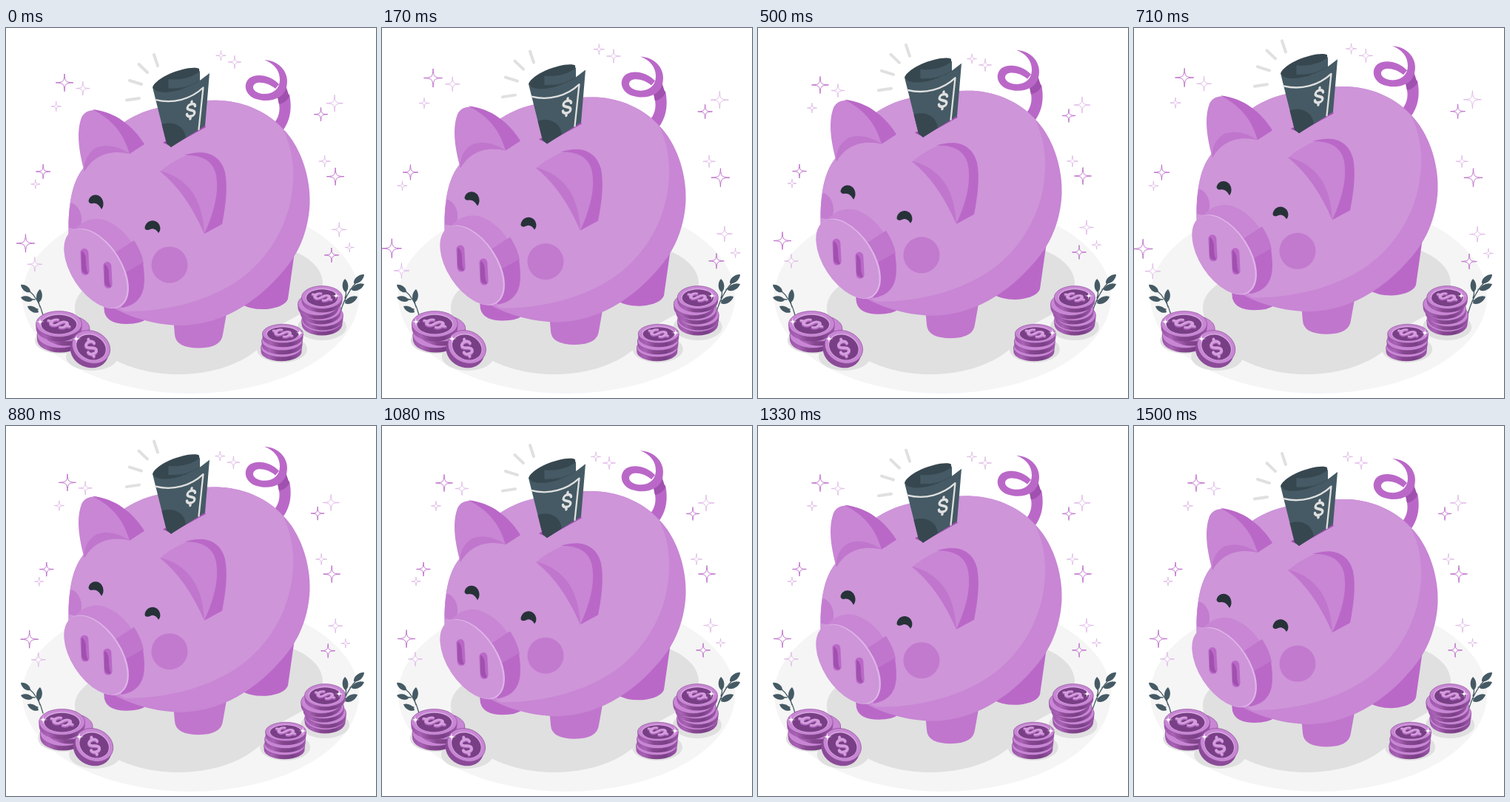
Animation, 500 px wide and 500 px high, one loop 1.54 s. Source, as an HTML page:

```html
<!DOCTYPE html>
<html lang="en">
<head>
<meta charset="utf-8">
<title>Piggy bank</title>
<style>
html, body { margin: 0; width: 100%; height: 100%; overflow: hidden; background: #fff; }
svg { display: block; width: 100vw; height: 100vh; }
</style>
</head>
<body>
<svg id="stage" viewBox="0 0 500 500" xmlns="http://www.w3.org/2000/svg"></svg>
<script>
const C = {
  light: '#ce95d9', mid: '#c886d4', leg: '#c076cd', deep: '#ba68c8', shade: '#a050ae',
  coin: '#793f86', ink: '#263238', bill: '#455a64', billDark: '#37474f', grey: '#e0e0e0'
};
const path = (d, fill, extra = '') => `<path d="${d}" fill="${fill}" ${extra}/>`;
const line = (d, color, w, extra = '') =>
  `<path d="${d}" fill="none" stroke="${color}" stroke-width="${w}" stroke-linecap="round" stroke-linejoin="round" ${extra}/>`;
const oval = (x, y, rx, ry, fill, extra = '') =>
  `<ellipse cx="${x}" cy="${y}" rx="${rx}" ry="${ry}" fill="${fill}" ${extra}/>`;
const group = (id, body) => `<g id="${id}">${body}</g>`;

const STAR = 'M0-10C.6-1 1-.6 10 0C1 .6 .6 1 0 10C-.6 1-1 .6-10 0C-1-.6-.6-1 0-10Z';
const star = (x, y, r, color) => path(STAR, '#fff',
  `stroke="${color}" stroke-width=".9" vector-effect="non-scaling-stroke" transform="translate(${x} ${y}) scale(${r / 10})"`);
const glint = (x, y) => path(STAR, '#fff', `transform="translate(${x} ${y}) scale(.6)"`);

const dollar = (transform, color, w) => line(
  'M5.5-4.5C5-9.5-5-9.5-5.500-4C-5.500 1 5.500-1 5.500 4.500C5.500 9.500-5 9.500-5.500 4.500M0-11.500V-8M0 8V11.500',
  color, w, `transform="${transform}"`);

function leaf(x, y, tx, ty) {
  const dx = tx - x, dy = ty - y, nx = -dy * .3, ny = dx * .3;
  const at = (f, s) => `${x + dx * f + nx * s} ${y + dy * f + ny * s}`;
  return path(`M${x} ${y}C${at(.2, 1)} ${at(.75, .9)} ${tx} ${ty}C${at(.75, -.9)} ${at(.2, -1)} ${x} ${y}`, C.bill);
}

function coin(x, y, rx, ry, h, face) {
  const side = `M${x - rx} ${y}v${h}a${rx} ${ry} 0 0 0 ${2 * rx} 0v${-h}z`;
  let out = path(side, 'url(#edge)') + oval(x, y, rx, ry, '#c886d4', 'stroke="#84488f" stroke-width=".6"');
  if (face) {
    const lay = `scale(1 .55) rotate(-62) scale(${rx / 23})`;
    out += oval(x, y, rx * .81, ry * .79, '#d9abe2') + oval(x, y + .6, rx * .77, ry * .73, C.coin) +
      dollar(`translate(${x} ${y + .8}) ${lay}`, '#b268c0', 4) +
      dollar(`translate(${x} ${y - .8}) ${lay}`, '#d49edd', 3.6);
  }
  return out;
}

const ground = oval(249.5, 363, 227.5, 131, '#f5f5f5') +
  path('M93 378C95 430 160 468 232 468C300 468 345 440 366 405C385 390 428 380 428 345C428 325 408 308 385 300L140 330C110 345 93 360 93 378Z', C.grey);

const twigs =
  line('M50 388C47 375 40 362 29 353M46 377Q43 370 45 362M43 380L36 379M39 367L31 366', C.bill, 1.3) +
  leaf(33, 357, 20, 347) + leaf(36, 368, 20, 364) + leaf(44, 384, 29, 376) + leaf(44, 371, 46, 353) +
  line('M450 391C455 370 463 353 478 339M458 365Q461 358 458 350M457 369L466 367M465 353L472 351', C.bill, 1.3) +
  leaf(470, 345, 484, 333) + leaf(459, 357, 458, 339) + leaf(467, 354, 484, 346) + leaf(458, 372, 475, 363);

const tail =
  path('M374 88L383 90C388 114 381 130 373 140L360 131C368 123 372 112 368 98Z', C.deep) +
  path('M378 78L383 93Q378 101 369 103L366 90Z', C.shade) +
  path('M349 43C371 44 384 62 379 80C375 97 354 101 338 96C323 91 319 75 330 67C340 61 358 64 369 76L364 82C355 74 343 72 337 75C330 80 336 88 347 89C361 90 370 82 370 70C370 57 362 48 349 43Z', C.deep);

const back = 'M85 285C83 245 88 210 104 190C115 172 140 150 157 129C170 120 186 112 205 108C230 101 260 97 290 98C325 100 355 115 374 136';
const body =
  path('M131 365L133 384Q137 400 163 400Q182 400 190 393L190 370Z', C.deep) +
  path('M318 360L318 373Q330 381 352 380Q377 377 381 366L390 303Z', C.deep) +
  path('M225 380L228 414Q229 432.500 261 432.500Q291 432 293 414L300 375Z', C.leg) +
  path(back + 'C397 158 412 200 410.500 238C409 270 398 300 380 322C350 360 300 402 235 402C197 401 155 389 120 362Z', C.mid) +
  path(back + 'C386 160 389 185 388 205C386 258 360 305 322 335C285 364 225 384 160 383L120 362Z', C.light) +
  path('M88 236C100 240 107 259 98 272L85 270Q84 250 88 236Z', C.leg, 'opacity=".8"') +
  oval(221, 320, 24.5, 24.5, C.leg, 'opacity=".85"');

const ears =
  path('M106 194C98 165 95 140 102 121C106 112 116 109 126 112C155 120 174 135 187 157L167 170C150 165 120 168 106 194Z', C.mid) +
  path('M106 194C104 181 112 166 124 161C138 157 152 160 167 170C145 165 121 168 106 194Z', C.leg) +
  path('M117 110C148 113 172 133 187 157L167 170C158 140 143 124 117 110Z', C.deep) +
  path('M208 194C230 176 255 164 274 170C297 178 301 210 292 265L268 278C252 240 233 215 208 194Z', C.mid) +
  path('M208 193C247 203 266 232 268 278C252 242 234 214 208 193Z', C.leg) +
  path('M241 172C265 164 289 168 296 195C300 215 297 240 292 265L268 278C282 248 289 218 283 195C278 178 262 171 241 172Z', C.deep);

const nostril = (x, y) =>
  `<rect x="${x}" y="${y}" width="11" height="36" rx="5.5" fill="${C.deep}" transform="rotate(-3 ${x + 5} ${y + 18})"/>` +
  path(`M${x + 1} ${y + 3}Q${x + 7} ${y + 6} ${x + 7} ${y + 17}T${x + 10} ${y + 34}Q${x + 2} ${y + 35} ${x + 1} ${y + 27}Z`, C.shade);

const face =
  path('M90 276C100 262 115 255 132 259C165 270 187 310 186.5 345C186 364 175 377 152 379Z', C.mid) +
  path('M147 304L173 287C180 298 184 307 186 318L162 332Z', C.leg) +
  path('M160 331L185 317C187 330 188 343 185.500 353C182 368 170 376 156 378Z', C.deep) +
  oval(122.5, 325, 60.6, 33.7, '#dfb5e7', 'transform="rotate(57 122.5 325)"') +
  oval(121, 325, 59.8, 32.9, C.light, 'transform="rotate(57 121 325)"') +
  nostril(101, 298) + nostril(132, 316) +
  path('M111.5 234C113 225 123 223 128.500 229C132.500 234 132.500 241 129 245C126 239 122 236 117 237Q113 238 111.500 234Z', C.ink) +
  path('M187.5 270C189 260 200 257 206 264C209.500 269 209 274 206 277C203 272 199 270 195 272C191 274 187.500 273 187.500 270Z', C.ink);

const bill =
  path('M212 155L222 149L268 131L270 134L223 160Z', C.shade) +
  path('M198 80C203 92 245 84 262 71L275 61L269 132L223 161L217 156Z', C.bill) +
  path('M198 80C204 64 250 49 261 55L262 70C248 84 203 94 198 80Z', C.billDark) +
  path('M219 69C235 71 252 67 262 58V71C250 81 232 83 219 82Z', C.bill) +
  line('M219 69V82Q246 83 262 71', C.billDark, .8) +
  path('M210.5 130C226 125 241 132 243 148L223 161L217 156Z', C.billDark) +
  line('M202 97C226 103 250 96 266.5 80.5L260.5 137', C.grey, 2.3) +
  dollar('translate(250 111) skewY(-14) rotate(5) scale(.95 1)', C.grey, 3.5) +
  line('M163 97.5L180 95M167 71L183 76M179.5 49L191 60M200 36L205 51', C.grey, 4);

const stack = (list, rx, ry, h) =>
  list.map(([x, y], i) => coin(x, y, rx, ry, h, i === list.length - 1)).join('');

const tilted = (x, y, rx, ry, fill, extra = '') => oval(x, y, rx, ry, fill, `transform="rotate(25 ${x} ${y})" ${extra}`);

const coins =
  oval(73, 422, 34, 18, C.grey) + oval(116, 444, 35, 19, C.grey) +
  oval(427, 404, 33, 18, C.grey) + oval(373, 434, 34, 18, C.grey) +
  stack([[73, 415], [82, 406], [71.5, 400]], 31, 17.5, 6) +
  tilted(112.5, 436.5, 26.5, 22, '#8b4a98') +
  tilted(115, 431, 26.5, 21.5, '#c886d4', 'stroke="#84488f" stroke-width=".6"') +
  tilted(115, 431, 21.5, 17.3, '#d9abe2') + tilted(115, 431.5, 20.5, 16.2, C.coin) +
  dollar('translate(115 433) rotate(-18) scale(1.05)', '#b268c0', 4) +
  dollar('translate(115 432) rotate(-18) scale(1.05)', '#d49edd', 3.6) +
  stack([[427, 395], [428, 388], [425, 380], [422, 373], [427, 364]], 27.5, 15.5, 5) +
  stack([[372, 432], [373, 423], [374, 413]], 27.5, 12.7, 5.5) +
  glint(46, 397) + glint(95, 420) + glint(446, 362) + glint(397, 412);

const DARK = '#ba68c8', PALE = '#deb6e6';
const sparkles = [
  [84, 77, 11.5, 1], [108, 84.5, 9], [73, 108, 6.5], [56, 193.5, 9.5, 1], [46, 210, 6],
  [33, 287.5, 12, 1], [45, 315, 9.5], [289, 41.5, 6.5], [307, 50, 8.5], [438, 104, 11],
  [420, 118.5, 9, 1], [425, 180, 7.5], [439, 200, 11.5, 1], [444, 269.5, 9.5],
  [457.5, 293, 6], [434, 303, 9.5, 1]
].map(([x, y, r, dark]) => star(x, y, r, dark ? DARK : PALE)).join('');

const stage = document.getElementById('stage');
stage.innerHTML =
  `<defs><linearGradient id="edge">
    <stop offset="0" stop-color="#9d56ab"/><stop offset=".2" stop-color="#a962b6"/>
    <stop offset=".4" stop-color="#86478f"/><stop offset=".7" stop-color="#793f86"/>
    <stop offset="1" stop-color="#9d56ab"/></linearGradient></defs>` +
  ground + twigs + group('pig', tail + body + ears + face + bill) +
  group('coins', coins) + group('sparkles', sparkles);

const LOOP = 1540, STEPS = 37;
const BEAT = [[0, 1], [.1, 1.115], [.292, 1], [.4, 1], [.5, 1.115], [.6, 1], [1, 1]];
const SHAKE = [0, -1, 1, -4, 5, -4.5, 4, -2, 1.5, -1.5, 0].map((v, i) => [i / 10, v]);
const smooth = f => f * f * (3 - 2 * f);

function sample(keys, p, ease = f => f) {
  const i = Math.max(1, keys.findIndex(k => k[0] >= p));
  const [a, from] = keys[i - 1], [b, to] = keys[i];
  return from + (to - from) * ease((p - a) / (b - a));
}

const [pig, pile, sky] = ['pig', 'coins', 'sparkles'].map(id => document.getElementById(id));
const move = (el, t) => el.setAttribute('transform', t);

function draw() {
  const step = Math.floor((performance.now() % LOOP + 4) * STEPS / LOOP) % STEPS;
  const p = (step + 1) / STEPS;
  const lift = 1 - Math.abs(2 * p - 1);
  move(pig, `translate(0 ${1.1 - 20.3 * lift})`);
  move(pile, `translate(${sample(SHAKE, p, smooth) + .2} 0)`);
  move(sky, `translate(243 177) scale(${sample(BEAT, p)}) translate(-243 -177)`);
  requestAnimationFrame(draw);
}
draw();
</script>
</body>
</html>
```
